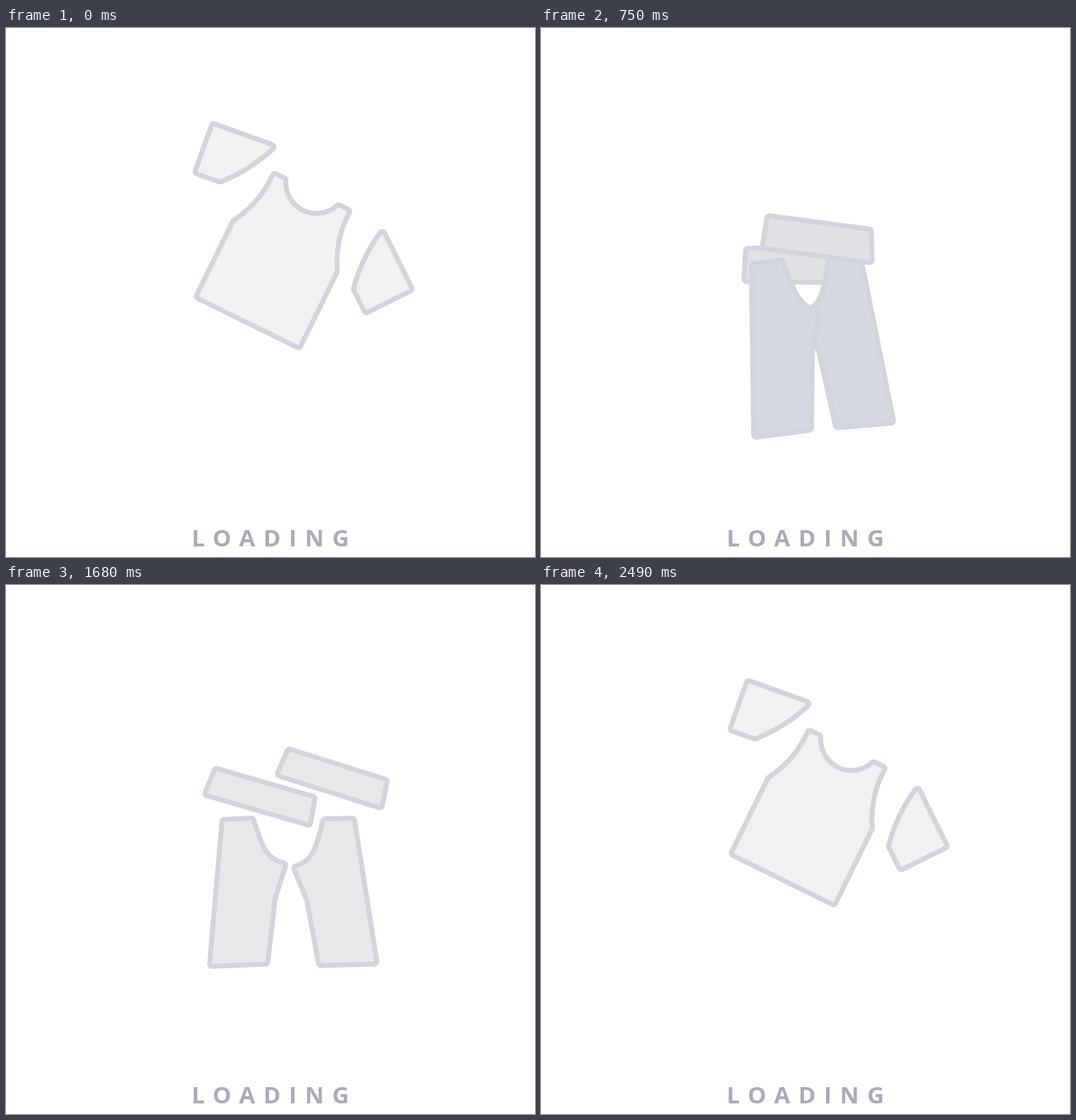
These frames come from a looping animation (748x748 px, 2520 ms). An HTML page:

```html
<!DOCTYPE html>
<html lang="en">
<head>
<meta charset="utf-8">
<title>Loading</title>
<style>
  html, body { margin: 0; width: 100%; height: 100%; overflow: hidden; background: #fff; }
  svg { display: block; width: 100vw; height: 100vh; }
  .piece {
    stroke: #d2d5dc; stroke-width: 14; stroke-linejoin: round;
    paint-order: stroke; vector-effect: non-scaling-stroke;
  }
  text { font: 700 33px "Open Sans", "Noto Sans", sans-serif; letter-spacing: 11.7px; }
</style>
</head>
<body>
<svg viewBox="0 0 748 748">
  <g id="stage"></g>
  <text id="label" x="262.5" y="733">LOADING</text>
</svg>
<script>
const LOOP = 2520, STEP = 30;
const LANDINGS = [540, 1800];
const TO_PANTS = 585, TO_SHIRT = 1870;
const GROUND = { x: 374, y: 689 };
const PALE = [241, 241, 241], GREY = [211, 214, 222];

const clamp = v => Math.max(0, Math.min(1, v));
const ramp = (t, a, b) => clamp((t - a) / (b - a));
const smooth = (t, a, b) => { const u = ramp(t, a, b); return u * u * (3 - 2 * u); };
const lerp = (a, b, u) => a + (b - a) * u;
const mix = (a, b, u) => `rgb(${a.map((v, i) => Math.round(lerp(v, b[i], u)))})`;

// Paths of the inner fills; sleeves start at the shoulder, the rest at the middle of the hem
const SLEEVE = 'M-88.5 3.5L-2 3.5Q-21 41 -55 71.5L-88.5 71.5Z';
const BODY = 'M-78.5 -3.5H78.5V-120Q55.5 -159 57 -203.5H43.5A46.8 46.8 0 0 1 -43.5 -203.5H-57Q-55.5 -159 -78.5 -120Z';
const LEG = 'M-37.5 -3.5H38L52 -93L69 -138.5C45 -145 38 -160 26.5 -203.5H-11.5Z';
const BAND = 'M-70.5 -17H70.5L74 17H-74Z';
const GUSSET = 'M-36 -190H36L0 -142Z';

// Pieces move between joined and apart poses: [x, y, angle]
const shirt = {
  start: -640, top: -10, land: 540, apex: { x: 341.5, y: 417 }, tilt: 26.2, squash: [.24, .5],
  pieces: [
    { d: SLEEVE, joined: [-59, -207, -21], apart: [-78, -242, -6.5] },
    { d: SLEEVE, flip: true, joined: [59, -207, 21], apart: [116, -201, 37.4] },
    { d: BODY }
  ]
};

const pants = {
  start: 640, top: 1235, land: 1800, apex: { x: 430.5, y: 426 }, tilt: -28.8, squash: [.34, .52],
  pieces: [
    { d: BAND, joined: [0, -180, 0], apart: [-53, -268, 27] },
    { d: GUSSET, hidden: true },
    { d: LEG, flip: true, late: 1, joined: [57, 0, 1.2], apart: [86, 4, .5] },
    { d: LEG, late: 1, joined: [-57, 0, -1.2], apart: [-87, -4, .3] },
    { d: BAND, settle: .6, joined: [0, -212, 0], apart: [98, -285, 55] }
  ]
};

const stage = document.getElementById('stage');
const label = document.getElementById('label');
const make = (name, parent) =>
  parent.appendChild(document.createElementNS('http://www.w3.org/2000/svg', name));

for (const g of [shirt, pants]) {
  g.el = make('g', stage);
  for (const p of g.pieces) {
    p.el = make('path', g.el);
    p.el.setAttribute('d', p.d);
    p.el.setAttribute('class', 'piece');
  }
}

// How hard the ground is being pressed, 0 to 1
const press = t => Math.max(...LANDINGS.map(l => smooth(t, l, l + 50) * (1 - smooth(t, l + 70, l + 120))));

function draw(g, t, q) {
  const up = ramp(t, g.start, g.top), down = ramp(t, g.top, g.land);
  const rising = down === 0;
  const h = rising ? 1 - (1 - up) ** 3 : 1 - down ** 3.6;
  const tilt = g.tilt * (rising ? h * h : 1 - smooth(down, .25, .9));
  const stretch = .42 * (1 - up) ** 4 * smooth(up, 0, .12);
  const sx = 1 + g.squash[0] * q, sy = 1 - g.squash[1] * q + stretch * (1 - q);
  const x = lerp(GROUND.x, g.apex.x, h), y = lerp(GROUND.y, g.apex.y, h);
  g.el.setAttribute('transform', `translate(${x} ${y}) rotate(${tilt}) scale(${sx} ${sy})`);

  for (const { el, flip, hidden, late = 0, settle = 0, joined = [0, 0, 0], apart = joined } of g.pieces) {
    const open = rising ? h ** (2 + 2 * late) : 1 - smooth(down, .66, 1);
    const [px, py, a] = joined.map((v, i) => lerp(v, apart[i], open));
    const turn = a * (1 - settle * down);
    el.setAttribute('transform', `translate(${px} ${py}) rotate(${turn})${flip ? ' scale(-1 1)' : ''}`);

    const lag = .12 * late;
    const grey = rising ? 1 - smooth(up, lag, lag + .4) : smooth(down, .7, .95);
    el.setAttribute('fill', mix(PALE, GREY, grey));
    if (hidden) el.style.display = open < .05 ? '' : 'none';
  }
}

function render(t) {
  const q = press(t);
  const inPants = t >= TO_PANTS && t < TO_SHIRT;
  pants.el.style.display = inPants ? '' : 'none';
  shirt.el.style.display = inPants ? 'none' : '';
  if (inPants) draw(pants, t, q);
  else draw(shirt, t >= TO_SHIRT ? t - LOOP : t, q);

  label.setAttribute('transform',
    `translate(375 733) scale(${1 + .095 * q} ${1 - .25 * q}) translate(-375 -733)`);
  label.setAttribute('fill', mix([169, 170, 185], [152, 153, 170], q));
}

const start = performance.now();
function tick() {
  const t = (performance.now() - start) % LOOP;
  render(Math.floor(t / STEP) * STEP);
  requestAnimationFrame(tick);
}
render(0);
requestAnimationFrame(tick);
</script>
</body>
</html>
```
